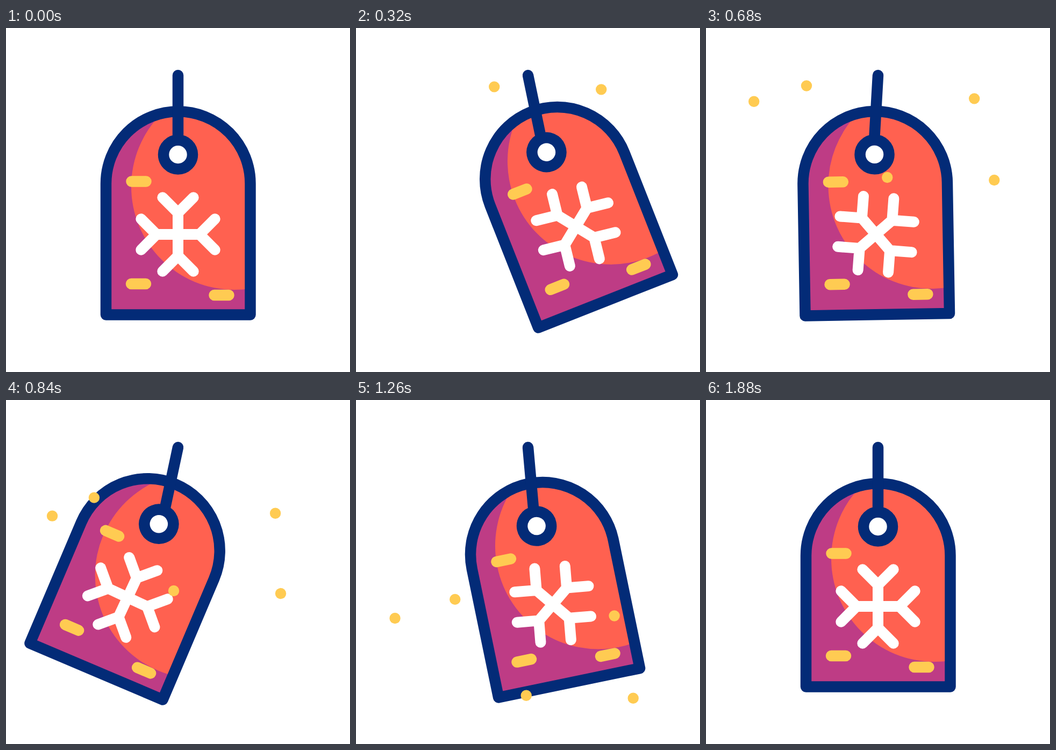
An HTML page that plays this animation: 640 px wide and 640 px high, repeating every 2400 ms.

```html
<!DOCTYPE html>
<html lang="en">
<head>
<meta charset="utf-8">
<title>Winter sale tag</title>
<style>
html, body { margin: 0; width: 100%; height: 100%; overflow: hidden; background: #fff; }
svg { display: block; width: 100%; height: 100%; }
.line { fill: none; stroke: #032b77; stroke-width: 20.5; stroke-linecap: round; stroke-linejoin: round; }
.dash { stroke: #ffcb52; }
.flake { stroke: #fff; stroke-width: 20; }
</style>
</head>
<body>
<svg viewBox="0 0 640 640">
  <defs>
    <path id="shape" d="M186 533.5V289.5A134.25 134.25 0 0 1 454.5 289.5V533.5Z"/>
    <clipPath id="inside"><use href="#shape"/></clipPath>
    <path id="arm" d="M0 0V-40M-28.7 -68.7L0 -40L28.7 -68.7"/>
  </defs>
  <g id="cord">
    <g id="tag">
      <use href="#shape" fill="#be3c85"/>
      <circle cx="425" cy="295" r="192" fill="#ff6150" clip-path="url(#inside)"/>
      <use href="#shape" class="line"/>
      <path class="line dash" d="M233.5 285.5h27M233 476h27M387.5 497h27"/>
      <g id="flake" class="line flake">
        <use href="#arm"/>
        <use href="#arm" transform="rotate(90)"/>
        <use href="#arm" transform="rotate(180)"/>
        <use href="#arm" transform="rotate(270)"/>
      </g>
      <circle class="line" cx="320" cy="235.5" r="27" style="fill:#fff"/>
    </g>
    <path class="line" d="M320 88V208"/>
  </g>
  <g id="dots" fill="#ffcb52"></g>
</svg>
<script>
const LOOP = 2400, SPIN_TIME = 1555, TAG_LAG = 45;
const SWAY = 37, SWAY_TIME = 740, MIDWAY = 840;

const $ = id => document.getElementById(id);
const smooth = p => p * p * (3 - 2 * p);

// Turning points of the dying swing: [ms, share of full swing]
const turns = [[0, 0], [407, -1], [863, 0.92], [1170, -0.42], [1660, 0]];

function swing(t) {
  const i = turns.findIndex(turn => turn[0] > t);
  if (i < 0) return 0;
  if (i === 0) return 0;
  const [t0, a] = turns[i - 1], [t1, b] = turns[i];
  return a + (b - a) * smooth((t - t0) / (t1 - t0));
}

// One full turn that brakes later than it starts
function spin(t) {
  const u = Math.min(t / SPIN_TIME, 1);
  return -360 * smooth(u - 0.45 * u ** 2.5 * (1 - u));
}

// Dots falling in a wave: x and y midway, time of a rightmost point
const early = { speed: 0.47, drift: 0.017 }, late = { speed: 0.457, drift: 0.044 };
const dots = [
  { ...early, x: 303, y: 353, peak: 685 },
  { ...early, x: 502, y: 358, peak: 685 },
  { ...late, x: 157, y: 180, peak: 678 },
  { ...late, x: 63, y: 212, peak: 735 },
  { ...late, x: 475, y: 207, peak: 748 }
];
for (const dot of dots) {
  dot.node = document.createElementNS("http://www.w3.org/2000/svg", "circle");
  dot.node.setAttribute("r", 10.2);
  $("dots").append(dot.node);
}

function draw(t) {
  const cord = 13.3 * swing(t), tag = 28.5 * swing(t - TAG_LAG);
  $("cord").setAttribute("transform", `rotate(${cord} 320 88)`);
  $("tag").setAttribute("transform", `rotate(${tag - cord} 320 209)`);
  $("flake").setAttribute("transform", `translate(320 384) rotate(${spin(t)})`);
  for (const { node, x, y, peak, speed, drift } of dots) {
    const phase = 2 * Math.PI * (t - peak) / SWAY_TIME, dt = t - MIDWAY;
    node.setAttribute("cx", x + drift * dt + SWAY * Math.cos(phase));
    // the fall slows a little while a dot crosses sideways
    node.setAttribute("cy", y + speed * dt + 3.3 * Math.sin(2 * phase));
  }
}

const start = performance.now();
function tick() {
  draw((performance.now() - start) % LOOP);
  requestAnimationFrame(tick);
}
tick();
</script>
</body>
</html>
```
